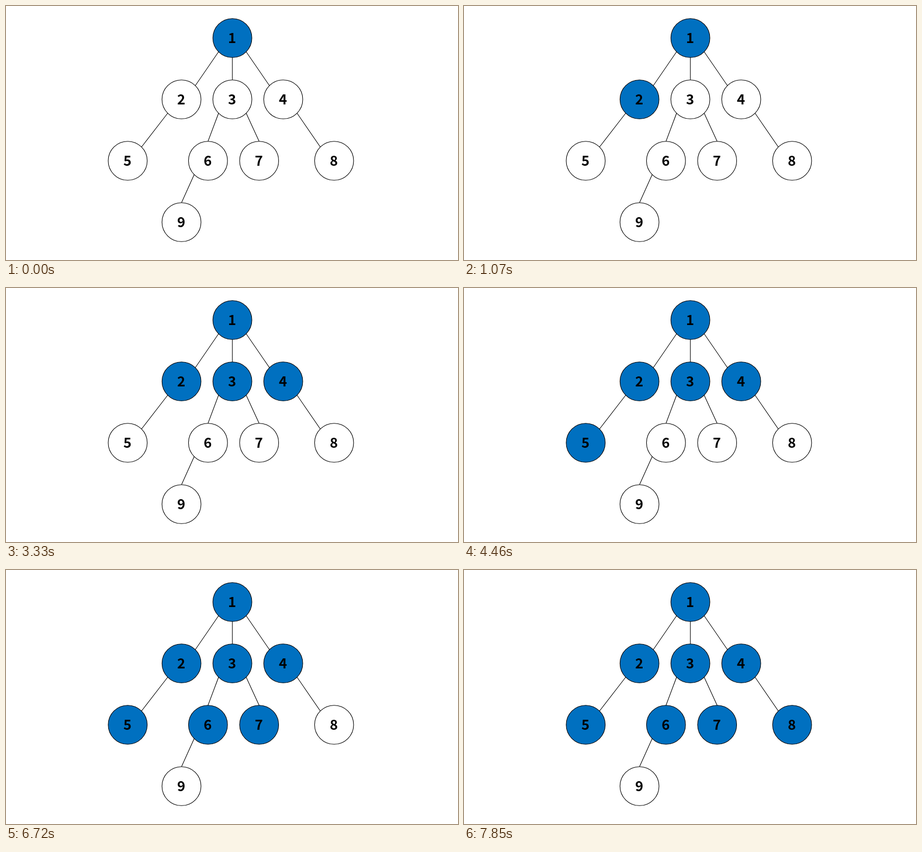
An HTML page that plays this animation: 853x480 px, repeating every 8000 ms.

```html
<!DOCTYPE html>
<html lang="en">
<head>
<meta charset="utf-8">
<title>Breadth-first search</title>
<style>
  html, body { margin: 0; width: 100%; height: 100%; overflow: hidden; background: #fff; }
  svg { display: block; width: 853px; height: 480px; }
  line, circle { stroke: #000; stroke-width: 1.1; }
  text {
    font: 700 26px "Noto Sans CJK KR", "Noto Sans CJK JP", "Noto Sans CJK SC", "Noto Sans", sans-serif;
    text-anchor: middle;
  }
</style>
</head>
<body>
<svg id="tree" viewBox="0 0 853 480"></svg>
<script>
const LOOP = 8000, FIRST = 1070, STEP = 1130;
const WHITE = '#fff', BLUE = '#0070c0';
const RADIUS = 36.8, GAP = 96, ROW = 116;

const tree = document.getElementById('tree');
const nodes = [];

function addNode(x, parent) {
  const node = { x, y: parent ? parent.y + ROW : 60.5, parent };
  nodes.push(node);
  return node;
}

// Nodes are added in visiting order
const root = addNode(427.2);
const [left, middle, right] = [-GAP, 0, GAP].map(dx => addNode(root.x + dx, root));
addNode(left.x - 101.5, left);
const inner = addNode(middle.x - GAP / 2 + 2, middle);
addNode(inner.x + GAP + 0.5, middle);
addNode(right.x + GAP, right);
addNode(left.x, inner);

function add(tag, attrs, text = '') {
  const el = document.createElementNS(tree.namespaceURI, tag);
  for (const [name, value] of Object.entries(attrs)) el.setAttribute(name, value);
  el.textContent = text;
  return tree.appendChild(el);
}

// Point on a node's rim: straight up or down, or diagonal towards one side
function rim(node, side, down) {
  const reach = side ? RADIUS * Math.SQRT1_2 : RADIUS;
  return [node.x + side * reach, node.y + down * reach];
}

function addEdge(parent, child) {
  const dx = child.x - parent.x;
  const side = Math.sign(dx);
  const [x1, y1] = rim(parent, side, 1);
  const [x2, y2] = rim(child, Math.abs(dx) > GAP * 0.8 ? -side : 0, -1);
  add('line', { x1, y1, x2, y2 });
}

nodes.slice(1).forEach(node => addEdge(node.parent, node));

const discs = nodes.map(({ x, y }, i) => {
  const disc = add('circle', { cx: x, cy: y, r: RADIUS, fill: WHITE });
  add('text', { x: x - 0.5, y: y + 9.5 }, i + 1);
  return disc;
});

const start = performance.now();

function draw(now) {
  const time = Math.max(0, now - start) % LOOP;
  const visited = 2 + Math.floor((time - FIRST) / STEP);
  discs.forEach((disc, i) => disc.setAttribute('fill', i < visited ? BLUE : WHITE));
  requestAnimationFrame(draw);
}
draw(start);
</script>
</body>
</html>
```
